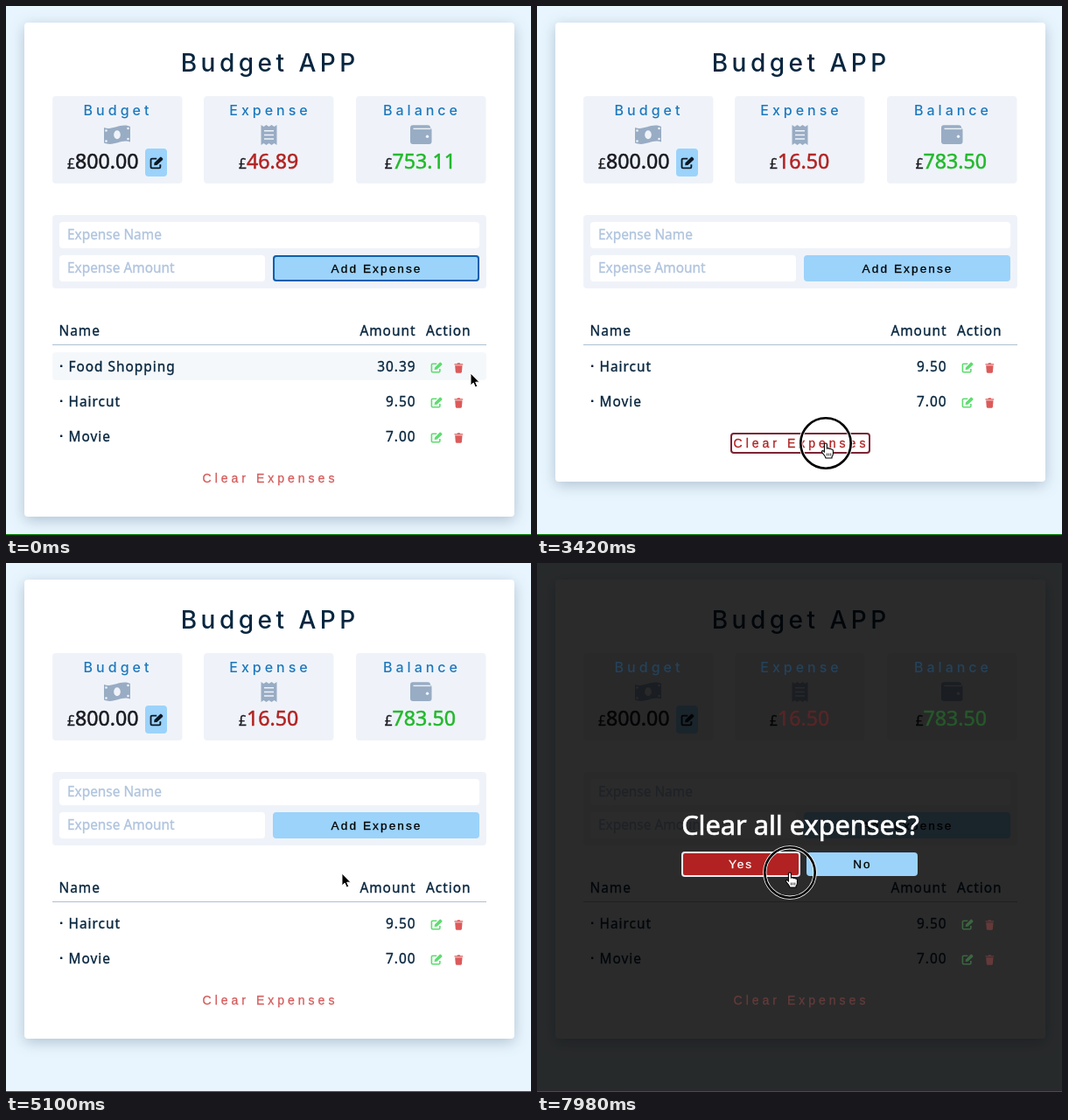
Write an HTML page that moves like this. It is 600 px wide and 605 px high and loops after 8 s.

```html
<!DOCTYPE html>
<html lang="en">
<head>
<meta charset="utf-8">
<title>Budget app</title>
<style>
html, body { margin: 0; width: 100%; height: 100%; overflow: hidden; background: #e8f5fe; }
body::after { content: ""; position: absolute; left: 0; top: 604px; width: 100%; height: 1px; background: #008000; }
svg { display: block; width: 600px; height: 605px; }
.body { font-family: "Noto Sans", sans-serif; }
.head { font-family: Inter, sans-serif; }
.ui { font-family: "Liberation Sans", Arial, sans-serif; }
.body, .ui { stroke-width: .022em; }
.card { filter: drop-shadow(0 4px 8px rgba(20, 50, 80, .26)); }
</style>
</head>
<body>
<svg id="stage" viewBox="0 0 600 605"></svg>
<script>
const LOOP = 8000;
const NAVY = '#08263f', PANEL = '#eff3f9', SKY = '#9bd3fb', STEEL = '#98acc4', FIRE = '#b22222';
const DELETED = 1240, ALERT_END = 3240;
const PRESSES = [[1120, DELETED], [3400, 3540], [4440, 4580], [6280, 6420], [7880, LOOP]];
const MODALS = [[3580, 4620], [6450, 9000]];
const FADE = 110;

// Pointer keys: time, x, y
const PATH = [
  [0, 531, 420], [650, 519, 415], [1500, 519, 415], [2250, 472, 458], [2380, 428, 503],
  [2780, 330, 500], [3700, 330, 500], [4140, 391, 349], [4760, 391, 349], [5100, 384, 355],
  [5900, 329, 498], [6600, 329, 498], [7400, 289, 354], [LOOP, 289, 354]
];

const clamp = v => Math.min(1, Math.max(0, v));
const inRange = (t, [a, b]) => t >= a && t < b;
const inside = ([px, py], x, y, w, h) => px >= x && px < x + w && py >= y && py < y + h;

// Monotone cubic interpolation: smooth while moving, still at rests
function slope(i, axis) {
  if (i < 1 || i > PATH.length - 2) return 0;
  const rate = k => (PATH[k + 1][axis] - PATH[k][axis]) / (PATH[k + 1][0] - PATH[k][0]);
  const a = rate(i - 1), b = rate(i);
  return a * b > 0 ? 2 * a * b / (a + b) : 0;
}
function pointer(t) {
  let i = 0;
  while (i < PATH.length - 2 && t >= PATH[i + 1][0]) i++;
  const span = PATH[i + 1][0] - PATH[i][0], u = clamp((t - PATH[i][0]) / span);
  return [1, 2].map(axis => {
    const p = PATH[i][axis], q = PATH[i + 1][axis];
    return p + (q - p) * u * u * (3 - 2 * u)
      + span * u * (1 - u) * (slope(i, axis) * (1 - u) - slope(i + 1, axis) * u);
  });
}

const modalOpacity = t => Math.max(...MODALS.map(([a, b]) =>
  clamp((t - a) / FADE) * clamp((b + FADE - t) / FADE)));

// Row highlight follows the pointer through a short fade
function rowHover(t, y) {
  let sum = 0;
  for (let k = 0; k < 10; k++) {
    const past = t - 20 * k;
    if (past > -110 && !modalOpacity(past) && inside(pointer(past), 53, y, 496, 32)) sum++;
  }
  return sum / 10;
}

const rect = (x, y, w, h, fill, r = 4, extra = '') =>
  `<rect x="${x}" y="${y}" width="${w}" height="${h}" rx="${r}" fill="${fill}" ${extra}/>`;
const outline = (x, y, w, h, color, r = 3) =>
  rect(x + 1, y + 1, w - 2, h - 2, 'none', r, `stroke="${color}" stroke-width="2"`);
const path = (d, fill, extra = '') => `<path d="${d}" fill="${fill}" ${extra}/>`;
const at = (x, y, content, scale = 1) => `<g transform="translate(${x} ${y}) scale(${scale})">${content}</g>`;
const group = (opacity, content) => `<g opacity="${opacity}">${content}</g>`;

// The trailing letter space is kept out of the alignment
function text(str, x, y, size, fill, { font = 'body', gap = 0, anchor = 'start', weight = 400 } = {}) {
  const shift = { start: 0, middle: gap / 2, end: gap }[anchor];
  const stroke = font === 'head' ? 'none' : fill;
  return `<text class="${font}" x="${x + shift}" y="${y}" font-size="${size}" fill="${fill}" stroke="${stroke}"
    letter-spacing="${gap}" text-anchor="${anchor}" font-weight="${weight}">${str}</text>`;
}
const uiText = (str, x, y, size, gap, fill) => text(str, x, y, size, fill, { font: 'ui', gap, anchor: 'middle' });
const cell = (str, x, y, anchor) => text(str, x, y, 15.4, NAVY, { gap: 1, anchor });

const editIcon = color =>
  path('M7.5 2.5H2.2Q1 2.5 1 3.7V11.8Q1 13 2.2 13H10.3Q11.5 13 11.5 11.8V9', 'none', `stroke="${color}" stroke-width="1.8"`) +
  path('M4.5 10l.5-2.9L11.2.9Q12 .2 12.8.9L14.1 2.2Q14.8 3 14.1 3.8L7.7 9.6z', color);
const trashIcon = color =>
  path('M0 1.2h3l.7-1h2.6l.7 1h3v1.4H0zM.7 3.4h8.6l-.6 7.4q-.1 1.2-1.2 1.2h-5q-1.1 0-1.2-1.2z', color);
const dot = (x, y, r) => `<circle cx="${x}" cy="${y}" r="${r}" fill="${PANEL}"/>`;

const moneyIcon = path('M112 139C122 143 131 133 142 138V155.5C132 151.5 123 161.5 112 156.5Z', STEEL) +
  `<ellipse cx="127" cy="147.2" rx="3.8" ry="5" fill="${PANEL}"/>` +
  dot(114.5, 142.5, 1.3) + dot(139.5, 140, 1.3) + dot(114.5, 154.5, 1.3) + dot(139.5, 152, 1.3);
const receiptIcon = path('M291.5 136l3 2 3-2 3 2 3-2 3 2 3-2v23l-3-2-3 2-3-2-3 2-3-2-3 2z', STEEL) +
  path('M295 142.7h11M295 147.4h11M295 152.1h11', 'none', `stroke="${PANEL}" stroke-width="1.5"`);
const walletIcon = rect(462, 136.3, 23, 8, STEEL, 3) + rect(462, 139, 24.5, 19, STEEL, 3) +
  path('M465.5 140.4h20', 'none', `stroke="${PANEL}" stroke-width="1.4"`) + dot(481.5, 149.2, 1.7);

const arrow = path('M0 0V14L3.2 11.1 5.4 16 7.8 15 5.7 10.2H10Z', '#000', 'stroke="#fff" stroke-width="1"');
const hand = path('M-1.6 1.5a1.5 1.5 0 0 1 3 0V6q1.5-.9 2.6.4 1.5-.6 2.4.6 2-.2 2 1.8v3.2q0 2-1.4 3.6V17H0q-.7-2.5-2.8-4.6-1.8-2-1.8-3 .9-1.8 3 .4z',
  '#fff', 'stroke="#000" stroke-width="1.1"') +
  path('M1.5 11.5v3M3.6 11.5v3M5.7 11.5v3', 'none', 'stroke="#000" stroke-width=".8"');

const ring = ([x, y]) => `<g fill="none"><circle cx="${x}" cy="${y}" r="28.7" stroke="#fff" stroke-width="4.2"/>
  <circle cx="${x}" cy="${y}" r="28.7" stroke="#000" stroke-width="2.6"/></g>`;

function render(t) {
  const pos = pointer(t), shade = modalOpacity(t), removed = t >= DELETED;
  const pressed = PRESSES.some(p => inRange(t, p));
  const rows = [['Food Shopping', '30.39'], ['Haircut', '9.50'], ['Movie', '7.00']].slice(removed ? 1 : 0);
  const lift = removed ? 40 : 0;
  const modalOn = MODALS.some(m => inRange(t, m));
  const pageActive = !modalOn && !shade && !(t > 6425 && t < 6450);
  const overClear = !modalOn && !shade && inside(pos, 221, 528 - lift, 160, 24);
  const overTrash = pageActive && inside(pos, 511, 405, 13, 17);
  const overYes = modalOn && inside(pos, 166, 331, 134, 27);
  const overNo = modalOn && inside(pos, 308, 331, 127, 27);
  const clearFocus = inRange(t, [3400, 4440]) || inRange(t, [6280, 7880]);

  // Saturated parts, which stay visible through the dark overlay
  let vivid = [['Budget', 126], ['Expense', 300], ['Balance', 473.5]].map(([name, x]) =>
    text(name, x, 124.5, 16, '#1c78bd', { font: 'head', gap: 4, anchor: 'middle', weight: 500 })).join('');
  vivid += text(removed ? '16.50' : '46.89', 275, 186, 23.2, FIRE) +
    text(removed ? '783.50' : '753.11', 441.5, 186, 23.2, '#22b82c');
  rows.forEach((row, i) => {
    const y = 396 + 40 * i, hot = i === 0 && overTrash;
    vivid += at(485.5, y + 11, editIcon('#5edc70'), .9);
    if (hot && inRange(t, [1120, DELETED])) vivid += rect(511, y + 10, 13.5, 15, '#fff', 3, `stroke="${FIRE}" stroke-width="2"`);
    vivid += at(512.5, y + 12, trashIcon(hot ? FIRE : '#dc5a5a'), .97);
  });
  vivid += uiText('Clear Expenses', 300, 545 - lift, 14, 4, overClear ? FIRE : '#d65c5c');
  if (clearFocus) vivid += outline(221, 528 - lift, 160, 24, overClear ? '#7a2535' : '#2f6fa8');

  let out = rect(0, 0, 600, 605, '#e8f5fe', 0) +
    rect(21, 19, 560, 565 - lift, '#fff', 4, 'class="card"') +
    text('Budget APP', 299.5, 75, 28, NAVY, { font: 'head', gap: 4.5, anchor: 'middle', weight: 500 });
  out += [53, 226, 400].map(x => rect(x, 103, 148.5, 100, PANEL)).join('') + moneyIcon + receiptIcon + walletIcon;
  out += [70, 266, 432.8].map(x => text('£', x, 186, 15.4, '#1a1a22')).join('') +
    text('800.00', 79, 186, 23.2, '#1a1a22') +
    rect(159, 163, 25, 32, SKY) + at(164.5, 172, editIcon('#0d1722'), 1.03);

  if (inRange(t, [DELETED, ALERT_END])) {
    out += '<linearGradient id="alert"><stop stop-color="#fed0d5"/><stop offset="1" stop-color="#eed6d5"/></linearGradient>' +
      rect(53, 211, 496, 20, 'url(#alert)') +
      text('Expense Deleted', 299.5, 225, 12.3, '#721c24', { gap: 3.9, anchor: 'middle' });
  }

  out += rect(53, 239, 496, 84, PANEL) + rect(61, 247, 480, 30, '#fff') + rect(61, 285, 235, 30, '#fff') +
    text('Expense Name', 70, 267, 15.4, '#b0c4de') + text('Expense Amount', 70, 305, 15.4, '#b0c4de') +
    rect(305, 285, 236, 30, SKY) + uiText('Add Expense', 422.5, 305, 13.6, 2.1, '#000');
  if (t < PRESSES[0][0]) out += outline(305, 285, 236, 30, '#0c5fae');

  out += cell('Name', 60.5, 377) + cell('Amount', 467.5, 377, 'end') + cell('Action', 530.5, 377, 'end') +
    rect(53, 387, 496, 1, '#adc0d0', 0);
  rows.forEach(([name, amount], i) => {
    const y = 396 + 40 * i;
    out += rect(53, y, 496, 32, PANEL, 4, `opacity="${rowHover(t, y)}"`) + rect(62, y + 14.5, 2.4, 2.4, NAVY, .5) +
      cell(name, 71.5, y + 22) + cell(amount, 467.5, y + 22, 'end');
  });
  out += group(1 - shade, vivid);

  if (shade) {
    const focusYes = t >= 7880, focusNo = inRange(t, [4440, 4740]);
    out += group(shade, rect(0, 0, 600, 605, '#000', 0, 'opacity=".83"') + group(.33, vivid) +
      text('Clear all expenses?', 301, 311, 30.7, '#fff', { anchor: 'middle' }) +
      rect(166, 331, 134, 27, overYes ? FIRE : '#e8605f') +
      rect(308, 331, 127, 27, overNo ? '#90caf9' : SKY) +
      (focusYes ? outline(165, 330, 136, 29, '#e9eef5') : '') +
      (focusNo ? outline(307, 330, 129, 29, '#e9eef5') : '') +
      uiText('Yes', 232, 349, 13.6, 2, overYes ? '#fff' : '#000') + uiText('No', 371, 349, 13.6, 2, '#000'));
  }

  if (pressed) out += ring(pos);
  const pointing = overYes || overNo || overTrash || (overClear && pageActive);
  return out + at(...pos, pointing ? hand : arrow);
}

const stage = document.getElementById('stage');
function tick() {
  stage.innerHTML = render(performance.now() % LOOP);
  requestAnimationFrame(tick);
}
tick();
</script>
</body>
</html>
```
